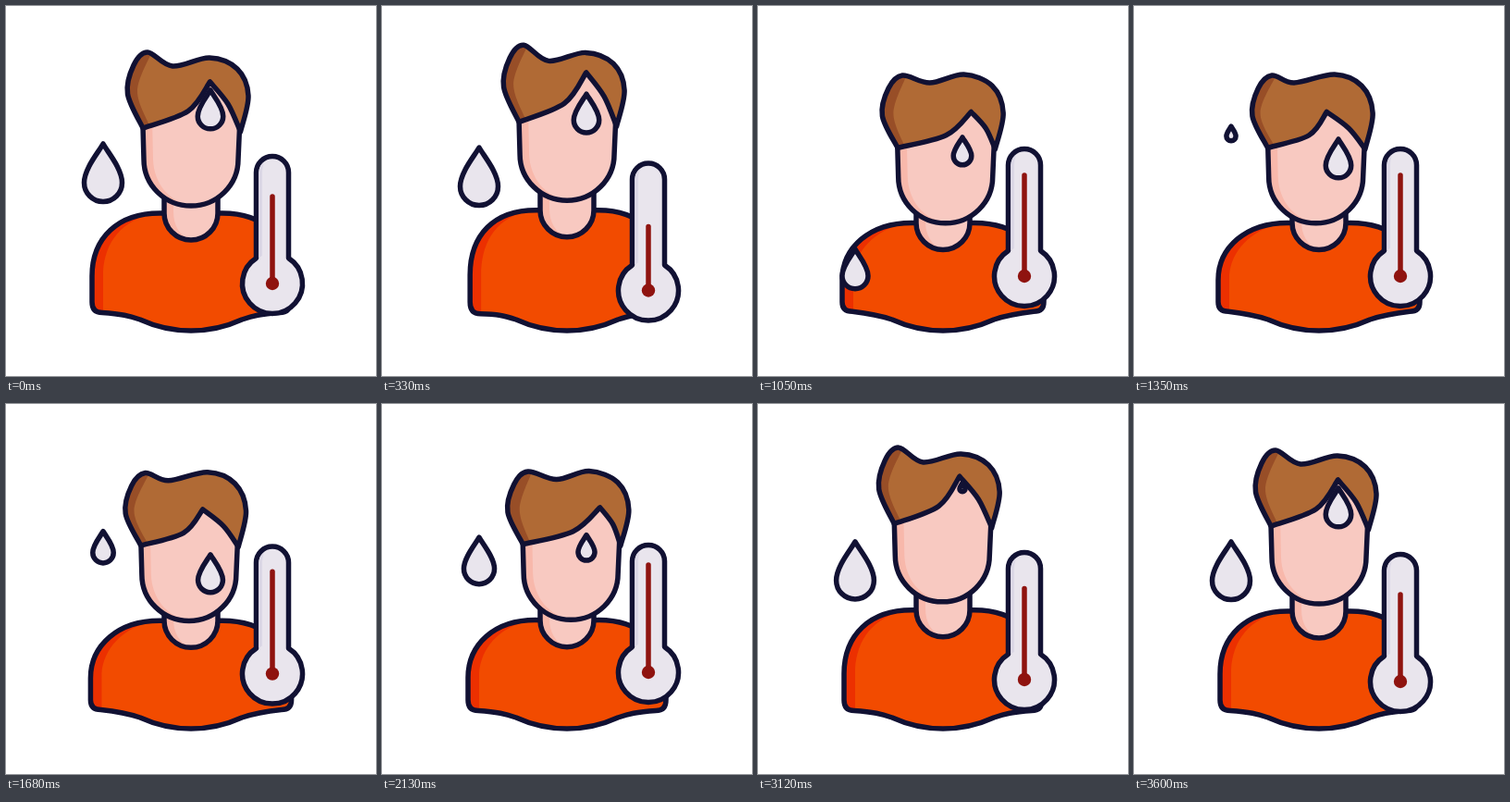
Animation, 400 px wide and 400 px high, one loop 5630 ms. Source, as an HTML page:

```html
<!DOCTYPE html>
<html lang="en">
<head>
<meta charset="utf-8">
<title>Fever</title>
<style>
  html, body { margin: 0; width: 100%; height: 100%; overflow: hidden; background: #fff; }
  svg { display: block; width: 100%; height: 100%; }
  .line { fill: none; stroke: #111133; stroke-width: 5.5; stroke-linecap: round; stroke-linejoin: round; }
  .skin { fill: #f8c9c1; }
  .blush { fill: #f8b8ab; }
  .drop { fill: #e9e5ed; vector-effect: non-scaling-stroke; }
</style>
</head>
<body>
<svg viewBox="0 0 400 400">
  <path id="shirt" fill="#f24b00"/>
  <path id="shirtShade" fill="#ec3000"/>
  <path id="shirtLine" class="line"/>
  <g id="neck">
    <path class="skin" d="M171 195V224A29 29 0 0 0 229 224V195Z"/>
    <path class="blush" d="M171 195V224A29 29 0 0 0 200 253C187 248 181 237 181 222V195Z"/>
    <path class="line" d="M171 200V224A29 29 0 0 0 229 224V200"/>
  </g>
  <g id="face">
    <path class="skin" d="M148 125L149 166A51 50 0 0 0 251 166L253 125L250 100L225 75H200Z"/>
    <path class="blush" d="M148 125L149 166A51 50 0 0 0 200 216C176 211 160 192 159 166L158 120Z"/>
    <path class="line" d="M148 130L149 166A51 50 0 0 0 251 166L252.5 132"/>
  </g>
  <path id="hair" fill="#b06a35"/>
  <path id="hairShade" fill="#984e27"/>
  <path id="hairLine" class="line"/>
  <g id="meter">
    <path class="line" style="fill:#e9e5ed" d="M270.5 272.6V180A17.5 17.5 0 0 1 305.5 180V272.6A32.5 32.5 0 1 1 270.5 272.6Z"/>
    <path fill="#dcd8e6" d="M273.2 272V180Q274 172 279 169Q277 174 277 182V270Z"/>
    <path id="mercury" stroke="#8f130f" stroke-width="5.5" stroke-linecap="round"/>
    <circle cx="288" cy="300" r="7.2" fill="#8f130f"/>
  </g>
  <path id="dropA" class="line drop"/>
  <path id="dropB" class="line drop"/>
</svg>
<script>
const LOOP = 5630, STEP = 30, ACTIVE = 3600;
const el = {};
document.querySelectorAll('[id]').forEach(n => el[n.id] = n);
const set = (id, d) => el[id].setAttribute('d', d);
const move = (id, x, y) => el[id].setAttribute('transform', `translate(${x} ${y})`);
const clamp = (v, a = 0, b = 1) => Math.min(b, Math.max(a, v));
const ease = (t, a, b) => (1 - Math.cos(Math.PI * clamp((t - a) / (b - a)))) / 2;

// The head stretches up, slumps, then rises past its rest height.
const sinkAt = t => -8 * ease(t, 0, 300) + 33 * ease(t, 300, 900) - 2 * ease(t, 1500, 2100)
  - 31 * ease(t, 2680, 3280) + 8 * ease(t, 3280, 3580);
const insetAt = t => 2.2 * ease(t, 0, 300) - 4.2 * ease(t, 300, 900) + 2 * ease(t, 1500, 2100);
const liftAt = t => 13 * ease(t, 0, 600) - 21 * ease(t, 600, 1000) - 2 * ease(t, 1500, 2100)
  + 10 * ease(t, 2700, 3300);
const heatAt = t => 94 - 43 * ease(t, 0, 600) + 58 * ease(t, 600, 1000) + 7 * ease(t, 1500, 2100)
  - 22 * ease(t, 2700, 3300);

// Head shake: a cosine swing with a half swing at each end.
function turnAt(t) {
  const c = Math.cos(Math.PI * (clamp(t, 280, 3280) - 880) / 600);
  return t < 880 ? (c + 1) / 2 : t > 2680 ? (c - 1) / 2 : c;
}

// Hair points: x, y, shift per turn, shift per sink.
const TEMPLE = [148, 132, 4.6, .85], EAR = [253.5, 136, 4.6, .75], TIP = [220.5, 82, 15.7, 1.3];
const BACK = [TEMPLE, [131.5, 95, 4.6, .95], [138, 64, 4.8, 1], [153, 50, 5, 1]];
const CROWN = [...BACK, [180, 65, 9, .72], [220, 56, 4, .72], [250, 68, 5, .73], [262, 97, 5, .75], EAR];
const STRAND = [EAR, [240, 106, 10, 1.05], TIP];
const FRINGE = [TIP, [197, 113.5, 10, 1.05], TEMPLE];
const INNER = [[157, 51, 5, 1], [142, 92, 7, .95], [156, 131, 4.6, .85]];

// Closed path made of smooth runs that meet at corners.
function outline(runs, turn, sink) {
  let d = '';
  for (const run of runs) {
    const p = run.map(([x, y, kx, ky]) => [x + kx * turn, y + ky * sink]);
    const at = i => p[clamp(i, 0, p.length - 1)];
    const ctrl = (i, k) => at(i).map((v, a) => v + k * (at(i + 1)[a] - at(i - 1)[a]) / 6);
    d += (d ? 'L' : 'M') + p[0];
    for (let i = 1; i < p.length; i++) d += `C${ctrl(i - 1, 1)} ${ctrl(i, -1)} ${p[i]}`;
  }
  return d + 'Z';
}

function drawShirt(d, inset) {
  const l = 93 + inset, r = 400 - l, top = 224 + d, mid = 252 + d, low = 292 + d * .4;
  const hem = 331.5 + inset * .6;
  const left = `M171 ${top}C120 ${top - 2} ${l} ${mid} ${l} ${low}V320Q${l} ${hem} ${l + 11} ${hem}`;
  const all = left + `C125 333 133 335 145 339C180 355 220 355 255 339C267 335 275 333 ${r - 11} ${hem}`
    + `Q${r} ${hem} ${r} 320V${low}C${r} ${mid} 280 ${top - 2} 229 ${top}`;
  set('shirt', all + 'Z');
  set('shirtLine', all);
  set('shirtShade', left + `L${l + 12} 332V${low - 5}C${l + 14} ${mid + 3} 125 ${top + 8} 160 ${top}Z`);
}

for (const id of ['dropA', 'dropB'])
  set(id, 'M0 0C5 9 20.5 27 20.5 42A20.5 20.5 0 0 1 -20.5 42C-20.5 27 -5 9 0 0Z');

function placeDrop(id, x, y, s) {
  el[id].setAttribute('transform', `translate(${x} ${y}) scale(${Math.max(s, .001)})`);
  el[id].style.visibility = s > .02 ? 'visible' : 'hidden';
}

// Falls while shrinking away, then swells again above its rest place.
function sideDrop(t) {
  const falling = t < 1140;
  const size = falling ? 1 - (t / 1140) ** 14 : 1 - (1 - (t - 1140) / 2460) ** 3.2;
  const fall = falling ? 27 * (t / 630) ** 2.95 : 0;
  placeDrop('dropA', 105, 124 + 25 * size + fall, size);
}

// Forehead, cheek, cheek, forehead: one drop every 1100 ms.
function faceDrop(t) {
  const n = Math.floor((t + 220) / 1100), age = (t + 220) % 1100;
  const tip = n % 3 ? 144 : 91, start = n ? 550 : 340;
  const grow = n ? 1 - (1 - clamp(age / 500)) ** 3 : 1;
  const fall = 200 * clamp((age - start) / (1100 - start)) ** 3;
  placeDrop('dropB', 221, tip - 7 * (1 - grow) + fall, .67 * grow * (1 - (age / 1100) ** 12));
}

function draw(t) {
  const sink = sinkAt(t), turn = turnAt(t);
  drawShirt(.42 * sink, insetAt(t));
  move('neck', 0, .42 * sink);
  move('face', 4.3 * turn, .75 * sink);
  const hair = outline([CROWN, STRAND, FRINGE], turn, sink);
  set('hair', hair);
  set('hairLine', hair);
  set('hairShade', outline([BACK, INNER], turn, sink));
  move('meter', 0, liftAt(t));
  set('mercury', `M288 300V${300 - heatAt(t)}`);
  sideDrop(t);
  faceDrop(t);
}

const begin = performance.now();
function tick() {
  const t = (performance.now() - begin) % LOOP;
  draw(Math.min(ACTIVE, Math.floor(t / STEP) * STEP));
  requestAnimationFrame(tick);
}
tick();
</script>
</body>
</html>
```
